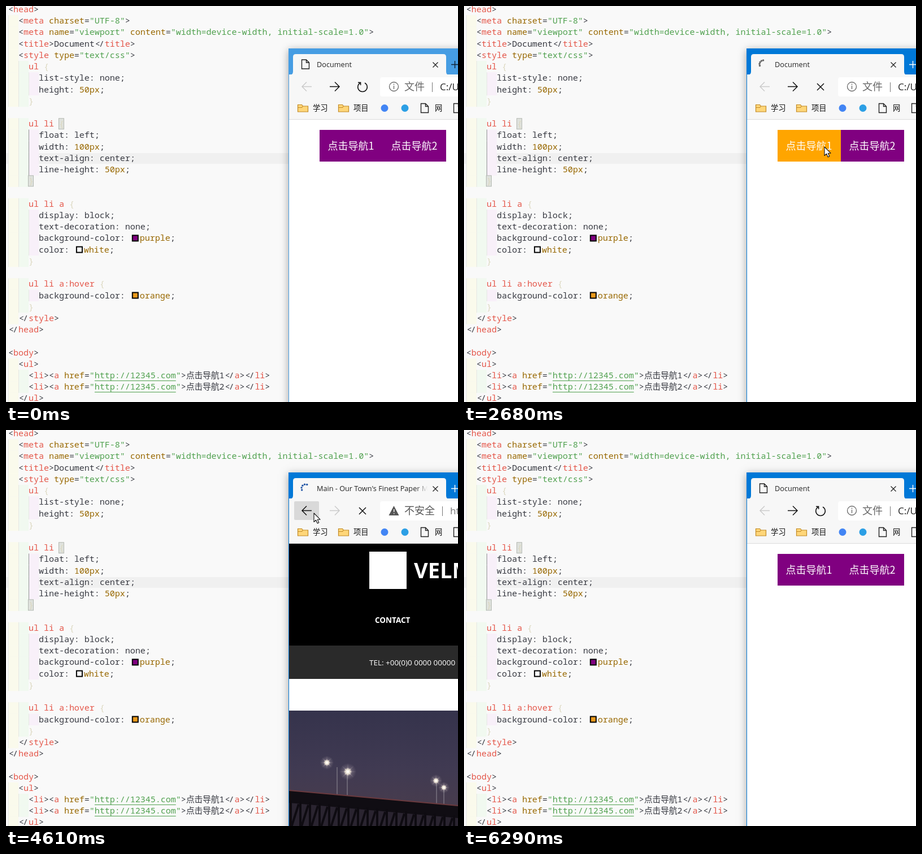
Animation of 800 by 700 pixels, one loop 6.46 s. Source, as an HTML page with a canvas:

```html
<!DOCTYPE html>
<html lang="zh">
<head>
<meta charset="UTF-8">
<style>
  html, body { margin: 0; width: 100%; height: 100%; overflow: hidden; }
  canvas { display: block; }
</style>
</head>
<body>
<canvas id="stage" width="800" height="700"></canvas>
<script>
const LOOP = 6460, ROW = 20.22, COL = 8.99, WIDE_COL = 14.7;
const UI = '"Open Sans", "Noto Sans CJK SC", "Noto Sans CJK", sans-serif';
const CJK = '"Noto Sans CJK SC", "Noto Sans CJK", sans-serif';
const MONO = '"Noto Sans Mono", "Noto Sans CJK SC", monospace';
const ARIAL = '"Liberation Sans", sans-serif';
const stage = document.getElementById('stage');
let ctx = stage.getContext('2d');

const rect = (color, x, y, w, h) => { ctx.fillStyle = color; ctx.fillRect(x, y, w, h); };
const fill = (color, d) => { ctx.fillStyle = color; ctx.fill(new Path2D(d)); };
const stroke = (color, width, d) => {
  ctx.strokeStyle = color;
  ctx.lineWidth = width;
  ctx.stroke(new Path2D(d));
};
const disc = (color, x, y, r) => {
  ctx.fillStyle = color;
  ctx.beginPath();
  ctx.arc(x, y, r, 0, 7);
  ctx.fill();
};
const text = (str, x, y, size, color, family = UI, weight = 400) => {
  ctx.font = `${weight} ${size}px ${family}`;
  ctx.fillStyle = color;
  ctx.fillText(str, x, y);
};
const clipped = (x, y, w, h, draw) => {
  ctx.save();
  ctx.beginPath();
  ctx.rect(x, y, w, h);
  ctx.clip();
  draw();
  ctx.restore();
};

const source = `<head>
  <meta charset="UTF-8">
  <meta name="viewport" content="width=device-width, initial-scale=1.0">
  <title>Document</title>
  <style type="text/css">
    ul {
      list-style: none;
      height: 50px;
    }

    ul li {
      float: left;
      width: 100px;
      text-align: center;
      line-height: 50px;
    }

    ul li a {
      display: block;
      text-decoration: none;
      background-color: purple;
      color: white;
    }

    ul li a:hover {
      background-color: orange;
    }
  </style>
</head>

<body>
  <ul>
    <li><a href="http://12345.com">点击导航1</a></li>
    <li><a href="http://12345.com">点击导航2</a></li>
  </ul>`.split('\n');

// Groups: tag bracket, tag or selector, attribute or value, string, brace, other
const TOKEN = /(<\/?)|((?<=<\/?)\w+|^\s*ul [^{]*)|([\w-]+(?==")|\d+px|purple|white|orange)|("[^"]*")|([{}])|(.)/gu;
const INK = ['#383a42', '#e45649', '#986801', '#50a14f', '#dcd8c0', '#383a42'];
const SWATCH = { purple: '#800080', white: '#fff', orange: '#ea9a1c' };
const INDENT = ['#fafaec', '#f1f9f0', '#f8f0f9'];

function drawCode() {
  rect('#f9f9f9', 0, 0, 800, 700);
  rect('#f0f0f0', 0, 260, 800, 19);
  source.forEach((line, row) => {
    const top = row * ROW - 4;
    const levels = line.search(/\S/) / 2;
    for (let i = 0; i < levels; i++) {
      const x = 4 + i * 18;
      rect(INDENT[i], x, top, 18, ROW + .3);
      rect(i == 2 && row > 10 && row < 15 ? '#929296' : '#e6e7e4', x, top, 1, ROW + .3);
    }
    let x = 4;
    for (const match of line.matchAll(TOKEN)) {
      const token = match[0], color = INK[match.slice(1).findIndex(g => g !== undefined)];
      if (SWATCH[token]) {
        rect('#000', x + 3, top + 4, 12, 12);
        rect(SWATCH[token], x + 5, top + 6, 8, 8);
        x += 17;
      }
      if (/[{}]/.test(token) && (row == 10 || row == 15)) {
        rect('#b3b8b1', x - 1, top, 10, 20);
        rect('#dfe2dd', x, top + 1, 8, 18);
      }
      if (token.startsWith('"http')) rect(color, x + COL, Math.round(top + 19), (token.length - 2) * COL, 1);
      [...token].forEach((ch, i) => {
        const ligature = token == '</' ? 1 - 2 * i : 0;
        text(ch, x + ligature, row * ROW + 11, 15, color, MONO);
        x += ch > '⺀' ? WIDE_COL : COL;
      });
    }
  });
}

const backdrop = document.createElement('canvas');
backdrop.width = 800;
backdrop.height = 700;
const main = ctx;
ctx = backdrop.getContext('2d');
drawCode();
ctx = main;

// Pointer moves: start, end, number of positions, from x y, to x y
const MOVES = [
  [220, 830, 9, 679, 617, 611, 278],
  [910, 1000, 2, 618, 264, 630, 257],
  [1300, 1380, 2, 690, 252, 714, 249],
  [1770, 2050, 5, 702, 249, 638, 249],
  [3580, 4050, 7, 638, 249, 563, 192],
  [4150, 4610, 7, 559, 182, 545, 147],
  [4680, 4681, 1, 655, 287, 655, 287],
  [4830, 5160, 5, 653, 279, 646, 246],
  [5780, 5920, 3, 646, 246, 702, 250],
  [6150, 6220, 2, 712, 300, 730, 560]
];
function pointerAt(t) {
  const move = MOVES.findLast(m => m[0] <= t);
  if (!move || t >= 6290) return { x: -99, y: -99 };
  const [start, end, n, x0, y0, x1, y1] = move;
  const step = Math.min(n - 1, Math.floor((t - start) / (end - start) * (n - 1) + .01));
  const p = n > 1 ? step / (n - 1) : 0;
  return { x: Math.round(x0 + (x1 - x0) * p), y: Math.round(y0 + (y1 - y0) * p) };
}

const ARROW = 'M0 0V15.5L3.6 12.2L6.2 18L8.8 16.8L6.3 11.2H11Z';
const HAND = 'M-2 1Q-2 -.8 0 -.8Q2 -.8 2 1V6Q4 5 5 7Q7 6 8 8Q10.5 7.5 10.5 10V14L8 21H-1L-6 13Q-7 10.5 -5 10.5L-2 13Z';
function drawPointer({ x, y }, hand) {
  ctx.save();
  ctx.translate(x, y);
  ctx.lineJoin = 'round';
  fill('#fff', hand ? HAND : ARROW);
  stroke('#111', 1.1, hand ? HAND : ARROW);
  if (hand) stroke('#111', 1, 'M2 6V11M5 7V11M8 8V11');
  ctx.restore();
}

const pageIcon = (x, y) =>
  stroke('#222', 1.4, `M${x} ${y}h8l5 5v11h-13zM${x + 8} ${y}v5h5`);
const folder = x => {
  const d = `M${x} 174.5h7l2 2.5h9v10h-18z`;
  fill('#ffd679', d);
  stroke('#c18a27', 1.2, d + `M${x} 179.5h7l2 -2.5`);
};

function drawSpinner(t, blue) {
  const turn = blue ? (t - 3740) / 1000 : (3500 - t) / 900;
  const gap = blue ? 34 - 14 * Math.cos(turn * 4 * Math.PI) : 27;
  const middle = blue ? -90 : -115;
  for (let i = -2; i <= 2; i++) {
    const a = (middle + turn * 360 + i * gap) * Math.PI / 180;
    disc(blue ? '#2457a7' : '#666', 530 + 7 * Math.cos(a), 103 + 7 * Math.sin(a), 1.7);
  }
}

function drawWindow(t, { active, loading, remote, backHover }) {
  const blue = active ? '#0078d7' : '#469de3';
  ctx.save();
  ctx.shadowColor = 'rgba(0,0,0,.35)';
  ctx.shadowBlur = 14;
  ctx.shadowOffsetY = 3;
  rect(blue, 500, 75, 320, 700);
  ctx.restore();
  rect('#f7f7f7', 501, 121, 299, 79);
  fill('#f7f7f7', 'M501 122Q508 122 508 116V90Q508 85 513 85H774Q779 85 779 90V116Q779 122 785 122Z');
  rect('#dcdcdc', 501, 200, 299, 1);

  if (loading) drawSpinner(t, remote); else pageIcon(523.5, 95);
  const fade = ctx.createLinearGradient(725, 0, 746, 0);
  fade.addColorStop(0, '#222');
  fade.addColorStop(1, 'rgba(34,34,34,0)');
  clipped(550, 86, 196, 36, () =>
    text(remote ? "Main - Our Town's Finest Paper Mill" : 'Document', 550, 108, 12.7, fade));
  stroke('#222', 1.3, 'M755.5 99.5l9 9m0 -9l-9 9');
  stroke(active ? '#fff' : '#123', 1.4, 'M788 103.5h13M794.5 97v13');

  if (backHover) fill('#d9d9d9', 'M512 126h40q2 0 2 2v29q0 2 -2 2h-40q-2 0 -2 -2v-29q0 -2 2 -2z');
  stroke(remote ? '#111' : '#cbcbcb', 1.5, 'M541 142.5H524m8 -8l-8 8l8 8');
  stroke(remote ? '#cbcbcb' : '#111', 1.5, 'M573 142.5H590m-8 -8l8 8l-8 8');
  stroke('#111', 1.5, loading ? 'M625 137l12 12m0 -12l-12 12'
    : 'M627 136A8.3 8.3 0 1 0 635 136M623 135.2h4.6v4.8');
  fill('#fff', 'M666 126H800V160H666Q662 160 662 156V130Q662 126 666 126Z');
  if (remote) {
    const settled = t > 3800;
    fill('#555', 'M686.5 134l9 17h-18z');
    rect('#fff', 686, 140, 1.4, 5);
    rect('#fff', 686, 147, 1.4, 1.5);
    clipped(700, 126, settled ? 62 : 56, 34, () => text('不安全', 705, 149, 18, '#555', CJK));
    rect('#777', settled ? 772 : 768, 135, 1, 17);
    text('http', settled ? 786 : 782, 149, 17, '#777');
  } else {
    stroke('#666', 1.3, 'M694.5 142.5a8 8 0 1 1 -16 0a8 8 0 1 1 16 0M686.5 141v6M686.5 137.5v2');
    text('文件', 705, 149, 18, '#666', CJK);
    rect('#777', 754, 135, 1, 17);
    text('C:/U', 768, 149, 17, '#222');
  }

  folder(516.5);
  text('学习', 543, 185, 13.3, '#111', CJK);
  folder(588.5);
  text('项目', 615, 185, 13.3, '#111', CJK);
  disc('#4285f4', 670, 180.5, 6.5);
  disc('#2c9fe5', 706, 180.5, 6.5);
  pageIcon(734.5, 172.5);
  text('网', 759, 185, 13.3, '#111', CJK);
  pageIcon(792.5, 172.5);
}

function drawLocalPage({ x, y }) {
  rect('#fff', 501, 201, 299, 499);
  [1, 2].forEach((n, i) => {
    const left = 555 + i * 112;
    const over = x >= left && x < left + 112 && y >= 219 && y < 275;
    rect(over ? '#ffa500' : '#800080', left, 219, 112, 56);
    text('点击导航' + n, left + 14.5, 254, 18, '#fff', CJK);
  });
}

function verticalFade(top, colors) {
  const g = ctx.createLinearGradient(0, top, 0, 700);
  colors.forEach((c, i) => g.addColorStop(i / (colors.length - 1), c));
  rect(g, 501, top, 299, 700 - top);
}

function drawLamp(x, y, r) {
  const glow = ctx.createRadialGradient(x, y, 0, x, y, r);
  glow.addColorStop(0, '#fff');
  glow.addColorStop(.3, 'rgba(255,245,225,.75)');
  glow.addColorStop(.5, 'rgba(230,215,215,.2)');
  glow.addColorStop(1, 'rgba(230,215,215,0)');
  disc(glow, x, y, r);
  for (let i = 0; i < 4; i++) {
    const dx = r * Math.cos(i * Math.PI / 4), dy = r * Math.sin(i * Math.PI / 4);
    stroke(glow, 1.4, `M${x - dx} ${y - dy}L${x + dx} ${y + dy}`);
  }
}

function drawBridge() {
  verticalFade(496, ['#35334c', '#403a52', '#4b3d4b']);
  stroke('#85808c', 1.2, 'M586 596V648M604 608V648M762 624V662M775 636V662');
  fill('#2a2430', 'M501 637L800 664V700H501Z');
  fill('#100d13', 'M501 637L800 664V686L501 659Z');
  stroke('#6b3a3e', 2, 'M501 637L800 664');
  let truss = '';
  for (let x = 504; x < 800; x += 17) truss += `M${x} ${655 + (x - 501) * .09}v50l14 -44`;
  stroke('#0e0b11', 4, truss);
  [[568, 588, 12], [605, 604, 15], [761, 620, 11], [775, 632, 10]].forEach(lamp => drawLamp(...lamp));
}

function drawRemotePage(t) {
  const family = t < 3980 ? ARIAL : UI;
  rect('#000', 501, 201, 299, 180);
  rect('#fff', 643, 215, 66, 66);
  text('VELMORA', 722, 262, 38, '#fff', UI, 700);
  text('CONTACT', 653, 341, 13.5, '#fff', family, 700);
  rect('#2a2a2a', 501, 381, 299, 60);
  text('TEL: +00(0)0 0000 00000', 643, 416, 13.5, '#fff', family);
  if (t < 3900) return verticalFade(440, ['#fff', '#fbfbfb', '#dedede']);
  rect('#fff', 501, 440, 299, 56);
  drawBridge();
}

function frame(now) {
  const t = now % LOOP;
  const pointer = pointerAt(t);
  const remote = t >= 3580 && t < 4680;
  const overLink = !remote && pointer.y >= 219 && pointer.y < 275;
  ctx.drawImage(backdrop, 0, 0);
  drawWindow(t, {
    active: t >= 2280,
    loading: t >= 2360 && t < 4680,
    remote,
    backHover: remote && pointer.y < 160
  });
  if (remote) drawRemotePage(t); else drawLocalPage(pointer);
  drawPointer(pointer, overLink && !(t >= 2600 && t < 3580));
  requestAnimationFrame(frame);
}
requestAnimationFrame(frame);
</script>
</body>
</html>
```
